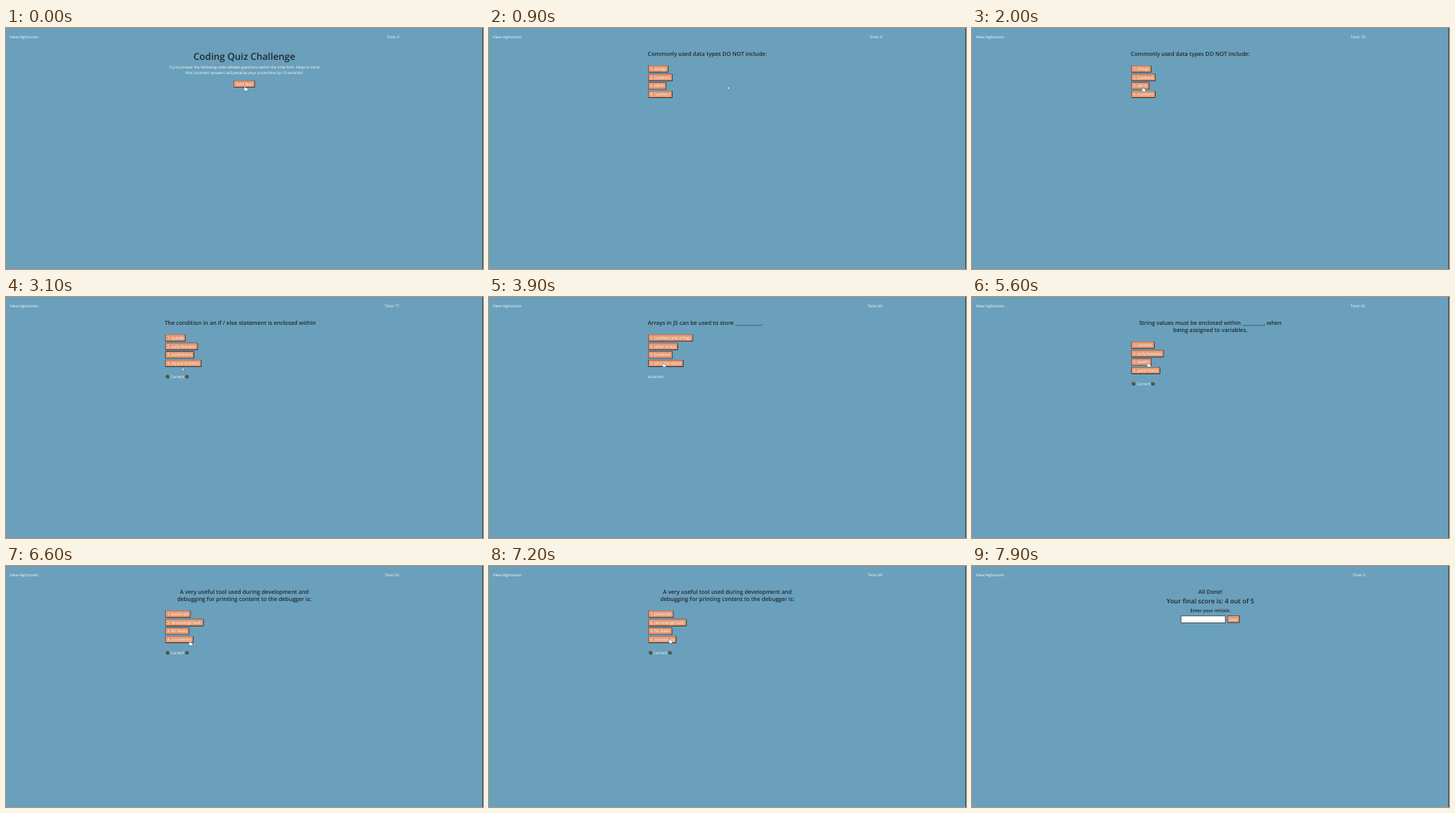
An HTML page that plays this animation: 600 by 303 pixels, repeating every 8 s.

```html
<!DOCTYPE html>
<html lang="en">
<head>
<meta charset="utf-8">
<title>Coding Quiz Challenge</title>
<style>
  html, body { margin: 0; width: 100%; height: 100%; overflow: hidden; background: #6aa0bb; }
  svg { display: block; width: 600px; height: 303px; }
  text {
    font: 500 4.75px "Open Sans", "Noto Sans", sans-serif;
    fill: #fff;
    text-rendering: geometricPrecision;
    white-space: pre;
  }
  .head { font-weight: 600; fill: #20282d; }
</style>
</head>
<body>
<svg id="stage" viewBox="0 0 600 303">
  <defs>
    <g id="bee">
      <ellipse cx="2.6" cy="2.6" rx="2.4" ry="2" fill="#2b3026" transform="rotate(45 2.6 2.6)"/>
      <path d="M1 2.2 2.8 1M2.2 3.9 4 2.4" stroke="#d9c25c" stroke-width=".8"/>
    </g>
  </defs>
  <rect width="600" height="303" fill="#6aa0bb"/>
  <rect x="599.4" width=".6" height="303" fill="#14191c"/>
  <text x="4.8" y="13.3">View Highscores</text>
  <text id="clock" x="494.8" y="13.3" text-anchor="end"></text>
  <g id="scene"></g>
  <g id="cursor" fill="#fff" stroke="#3a4248" stroke-width=".35" stroke-linejoin="round">
    <path id="hand" transform="translate(-.5 -.3)" d="M0 .5Q.6-.2 1.2.5V2.5L3.6 3Q4.3 3.2 4.2 4L3.7 6.3H.7L-1.2 3.8Q-1.2 3-.4 3.2L0 3.6Z"/>
    <path id="arrow" d="M0 0V4.4L1 3.6 1.7 5.2 2.5 4.8 1.8 3.3H3.1Z"/>
  </g>
</svg>
<script>
const LOOP = 8000, STEP = 100;
const $ = id => document.getElementById(id);
const layer = $('scene');
let targets = [];   // areas that change the pointer

function add(tag, attrs, content) {
  const el = document.createElementNS('http://www.w3.org/2000/svg', tag);
  for (const key in attrs) el.setAttribute(key, attrs[key]);
  if (content) el.textContent = content;
  return layer.appendChild(el);
}

const label = (str, x, y, anchor = 'start') => add('text', { x, y, 'text-anchor': anchor }, str);

function heading(str, y, size, x) {
  const el = label(str, x ?? 299.8, y, x ? 'start' : 'middle');
  el.setAttribute('class', 'head');
  el.style.fontSize = size + 'px';
}

function button(str, x, y, focused) {
  const text = label(str, x + 2.5, y + 6.1);
  const w = text.getComputedTextLength() + 5.2, h = 9;
  const box = (inset, size, fill, rx) => layer.insertBefore(add('rect',
    { x: x + inset, y: y + inset, width: w - size, height: h - size, rx, fill }), text);
  box(0, 0, '#2c2320', .9);
  box(0, .6, focused ? '#5a3c30' : '#8a5f4d', .8);
  box(.6, 1.5, '#e59b76', .4);
  targets.push({ x, y, w, h, shape: 'hand' });
}

function input(x, y, w, h) {
  add('rect', { x, y, width: w, height: h, fill: '#fff', stroke: '#2a2f33', 'stroke-width': .7 });
  targets.push({ x, y, w, h, shape: 'none' });
}

function question(lines, answers, result, focus) {
  return () => {
    const drop = (lines.length - 1) * 9;
    lines.forEach((line, i) => heading(line, 35 + 9 * i, 7.03, drop ? undefined : 199.8));
    answers.forEach((a, i) => button(`${i + 1}. ${a}`, 200.3, 47 + drop + 10.65 * i, focus === i + 1));
    const happy = result === 'Correct!', y = 101.9 + drop;
    if (result) label(result, happy ? 207 : 200, y);
    if (happy) for (const x of [200.6, 225]) add('use', { href: '#bee', x, y: y - 4.5 });
  };
}

function intro() {
  heading('Coding Quiz Challenge', 39.8, 11.87);
  label('Try to answer the following code-related questions within the time limit. Keep in mind', 299.7, 50.6, 'middle');
  label('that incorrect answers will penalize your score/time by 10 seconds!', 299.7, 58.1, 'middle');
  button('Start Quiz', 286.2, 66);
}

function done() {
  heading('All Done!', 35, 7.1);
  heading('Your final score is: 4 out of 5', 47.2, 8.15);
  heading('Enter your initials:', 57.8, 5.75);
  input(263, 62.8, 55.8, 8.6);
  button('Save', 321.2, 62.4);
}

const scenes = [
  { at: 0, draw: intro },
  { at: 800, draw: question(['Commonly used data types DO NOT include:'],
    ['strings', 'booleans', 'alerts', 'numbers']) },
  { at: 2400, gain: 5, draw: question(['The condition in an if / else statement is enclosed within'],
    ['quotes', 'curly brackets', 'parenthesis', 'square brackets'], 'Correct!', 3) },
  { at: 3700, gain: -10, draw: question(['Arrays in JS can be used to store ___________.'],
    ['numbers and strings', 'other arrays', 'booleans', 'all of the above'], 'Incorrect', 4) },
  { at: 5500, gain: 5, draw: question(['String values must be enclosed within _________, when', 'being assigned to variables.'],
    ['commas', 'curly brackets', 'quotes', 'parenthesis'], 'Correct!', 4) },
  { at: 6500, gain: 5, draw: question(['A very useful tool used during development and', 'debugging for printing content to the debugger is:'],
    ['JavaScript', 'terminal/git bash', 'for loops', 'console log'], 'Correct!') },
  { at: 7300, draw: done }
];

// Counts down from 75; gains show up on the next tick.
function timeLeft(t) {
  const first = 1200, every = 515;
  if (t < first || t >= scenes.at(-1).at) return 0;
  const n = Math.floor((t - first) / every), ticked = first + n * every;
  return scenes.reduce((sum, s) => sum + (s.at <= ticked ? s.gain ?? 0 : 0), 75 - n);
}

// Pointer moves: start, end, x, y
const moves = [
  [1100, 2000, 214.8, 74],
  [2700, 3100, 221.5, 88.5],
  [3200, 3400, 219, 82],
  [4200, 5000, 219.6, 83],
  [5300, 5600, 221.2, 82],
  [6300, 6600, 231, 94],
  [6700, 6900, 227, 91],
  [7200, 7700, 291, 67]
];

const ease = k => k * k * (3 - 2 * k);

function pointAt(t) {
  let x = 300.4, y = 73;
  for (const [from, to, nx, ny] of moves) {
    const k = ease(Math.min(1, Math.max(0, (t - from) / (to - from))));
    x += (nx - x) * k;
    y += (ny - y) * k;
  }
  return [x, y];
}

function shapeAt(x, y) {
  const hit = targets.find(b => x >= b.x && x <= b.x + b.w && y >= b.y && y <= b.y + b.h);
  return hit ? hit.shape : 'arrow';
}

let shown;
function render(t) {
  const scene = scenes.findLast(s => s.at <= t);
  if (scene !== shown) {
    layer.replaceChildren();
    targets = [];
    scene.draw();
    shown = scene;
  }
  $('clock').textContent = 'Time: ' + timeLeft(t);
  const [x, y] = pointAt(t), shape = shapeAt(x, y);
  for (const id of ['hand', 'arrow']) $(id).style.display = id === shape ? '' : 'none';
  $('cursor').setAttribute('transform', `translate(${x} ${y})`);
}

const start = performance.now();
function tick() {
  const t = (performance.now() - start) % LOOP;
  render(Math.floor(t / STEP) * STEP);
  requestAnimationFrame(tick);
}
tick();
</script>
</body>
</html>
```
